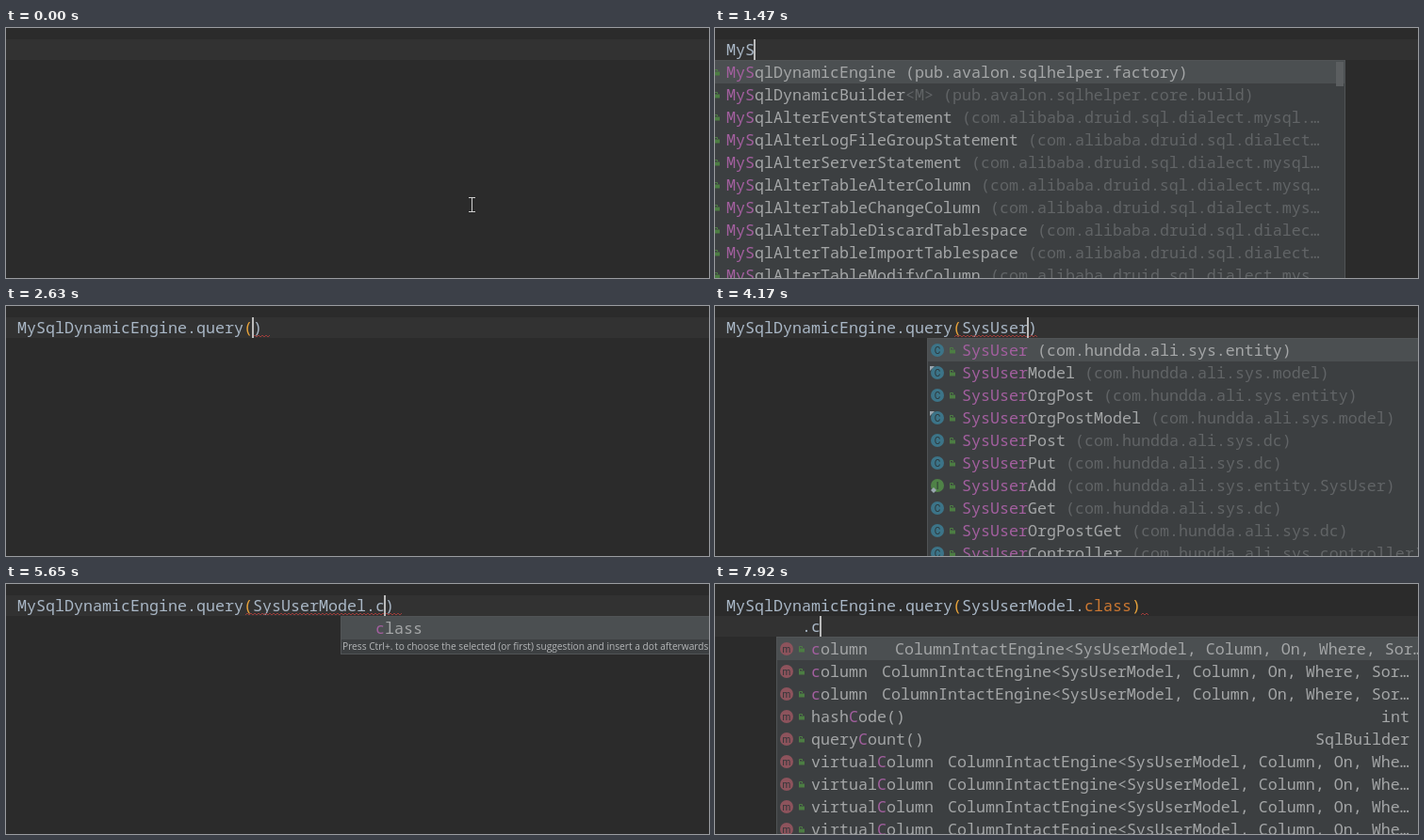
An HTML page that plays this animation: 746 by 266 pixels, repeating every 8000 ms.

```html
<!DOCTYPE html>
<html lang="en">
<head>
<meta charset="utf-8">
<title>Code completion</title>
<style>
  html, body { margin: 0; width: 100%; height: 100%; overflow: hidden; background: #2b2b2b; }
  svg { display: block; width: 746px; height: 266px; }
  text { white-space: pre; }
  .code { font: 16.6667px "Noto Sans Mono", "DejaVu Sans Mono", monospace; }
  .hint { font: 10.2px "Open Sans", "Noto Sans", sans-serif; }
  .icon { font: 10px Roboto, sans-serif; text-anchor: middle; }
</style>
</head>
<body>
<svg id="stage" viewBox="0 0 746 266"></svg>
<script>
const LOOP = 8000, CELL = 10, LEFT = 12, ROW = 24, LINE = 22;
const INK = '#a9b7c6', ITEM = '#a4a6a7', DIM = '#616466', MATCH = '#a35f9f', GOLD = '#e8a33a';
const stage = document.getElementById('stage');

const esc = s => s.replace(/&/g, '&amp;').replace(/</g, '&lt;');
const rect = (x, y, w, h, fill) => `<rect x="${x}" y="${y}" width="${w}" height="${h}" fill="${fill}"/>`;
const label = (x, y, s, fill, extra = '') =>
  `<text class="code" x="${x}" y="${y}" fill="${fill}" ${extra}>${esc(s)}</text>`;

// Completion rows: icon kind, text, optional result type after "|"
const druid = 'com.alibaba.druid.sql.dialect.mysql.';
const cut = (s, n) => s.length > n ? s.slice(0, n - 1) + '…' : s;
const classes = (names, pack) => names.map(n => 'c' + cut(`${n} (${pack}`, 63));
const lists = {
  M: ['cMySqlDynamicEngine (pub.avalon.sqlhelper.factory)', 'cMap<K, V> (java.util)',
    'cMap<E, F> (com.sun.javafx.collections.MappingChange)', 'cMath (java.lang)',
    'cMalformedParameterizedTypeException (java.lang.reflect)',
    'cMalformedParametersException (java.lang.reflect)',
    'cManagementFactory (java.lang.management)', 'cManagementPermission (java.lang.management)',
    'cManifest (java.util.jar)', 'cMatcher (java.util.regex)'],
  MyS: ['cMySqlDynamicEngine (pub.avalon.sqlhelper.factory)',
    'cMySqlDynamicBuilder<M> (pub.avalon.sqlhelper.core.build)',
    ...classes(['EventStatement', 'LogFileGroupStatement', 'ServerStatement', 'TableAlterColumn',
      'TableChangeColumn', 'TableDiscardTablespace', 'TableImportTablespace', 'TableModifyColumn']
      .map(n => 'MySqlAlter' + n), druid + 'ast.statement)')],
  engine: ['mquery(Class<T> tableClass)|SqlQuery<T>', 'mquery(String tableName)|SqlQuery<T>',
    'minsert(Class<T> tableClass)|SqlInsert', 'mupdate(Class<T> tableClass)|SqlUpdate',
    'mdelete(Class<T> tableClass)|SqlDelete', 'mtable(Class<T> tableClass)|SqlTable',
    'mcolumn(Class<T> tableClass)|SqlColumn', 'mwhere(Class<T> tableClass)|SqlWhere',
    'mgroup(Class<T> tableClass)|SqlGroup', 'msort(Class<T> tableClass)|SqlSort'],
  user: ['cSysUser (com.hundda.ali.sys.entity)', 'aSysUserModel (com.hundda.ali.sys.model)',
    'cSysUserOrgPost (com.hundda.ali.sys.entity)', 'aSysUserOrgPostModel (com.hundda.ali.sys.model)',
    'cSysUserPost (com.hundda.ali.sys.dc)', 'cSysUserPut (com.hundda.ali.sys.dc)',
    'iSysUserAdd (com.hundda.ali.sys.entity.SysUser)', 'cSysUserGet (com.hundda.ali.sys.dc)',
    'cSysUserOrgPostGet (com.hundda.ali.sys.dc)', 'cSysUserController (com.hundda.ali.sys.controller)'],
  keys: ['kclass', 'kthis', 'ksuper', 'knew', 'karg', 'kcast', 'kpar', 'kreturn', 'kvar', 'kfield'],
  chain: [],
  c: []
};
const columnType = 'ColumnIntactEngine<SysUserModel, Column, On, Where, Sort>';
const wide = n => `m${n}|${cut(columnType, 56)}`;
const virtual = 'mvirtualColumn|' + cut(columnType, 49);
lists.q = lists.engine.slice(0, 2);
lists.userM = [lists.user[1], lists.user[3]];
lists.klass = ['kclass'];
lists.c = [wide('column'), wide('column'), wide('column'), 'mhashCode()|int',
  'mqueryCount()|SqlBuilder', virtual, virtual, virtual, virtual];
lists.chain = [wide('column'), wide('column'), wide('column'), 'mequals(Object obj)|boolean',
  'mhashCode()|int', 'mquery()|SqlBuilder', 'mqueryCount()|SqlBuilder', virtual, virtual];

function icon(kind, x, y) {
  const fill = { m: '#8d535c', i: '#4f8247' }[kind] || '#3c7488';
  const letter = { m: 'm', i: 'I' }[kind] || 'C';
  let s = `<circle cx="${x}" cy="${y}" r="7" fill="${fill}"/>` +
    `<text class="icon" x="${x}" y="${y + 3.5}" fill="#2c3437">${letter}</text>`;
  if (kind === 'a') s += `<path d="M${x - 8} ${y - 7}h5l-5 5z" fill="#9aa7b0"/>`;
  if (kind === 'i') s += `<path d="M${x - 4} ${y + 2}l3 3-3 3-3-3z" fill="#9aa7b0"/>`;
  return s + rect(x + 13, y - 0.5, 6, 4, '#4c7d43') +
    `<path d="M${x + 13.5} ${y}v-2.5h3v1.5" fill="none" stroke="#4c7d43"/>`;
}

// Colours the typed letters, in order, inside a name
function marked(x, y, name, typed, extra) {
  let k = 0, runs = [];
  for (const ch of name) {
    const hit = k < typed.length && ch.toLowerCase() === typed[k].toLowerCase();
    if (hit) k++;
    const last = runs[runs.length - 1];
    if (last && last.hit === hit) last.s += ch; else runs.push({ hit, s: ch });
  }
  return runs.map(r => {
    const s = label(x, y, r.s, r.hit ? MATCH : ITEM, extra);
    x += r.s.length * CELL;
    return s;
  }).join('');
}

function popup({ list, col, typed = '', hint, line = 0, right = 760 }) {
  const rows = lists[list], x = LEFT + col * CELL - 37, top = 34 + line * LINE;
  const height = rows.length * ROW + (hint ? 17 : 2);
  let s = rect(x, top, right - x, height, '#515456') +
    rect(x + 1, top + 1, right - x - 2, height - 2, '#3c3f41') +
    rect(x + 1, top + 1, right - x - 2, ROW, '#4b4f51');
  rows.forEach((row, i) => {
    const y = top + 1 + i * ROW, kind = row[0], [body, type] = row.slice(1).split('|');
    const name = body.match(/^\w+/)[0], rest = body.slice(name.length);
    const tx = x + 37, bold = kind === 'k' ? 'font-weight="700"' : '';
    if (kind !== 'k') s += icon(kind, x + 11, y + 12);
    s += marked(tx, y + 18, name, typed, bold);
    s += label(tx + name.length * CELL, y + 18, rest, i === 0 || kind === 'm' ? ITEM : DIM);
    if (type) {
      const end = i === 0 && type.endsWith('…') ? 751 : 737;
      s += label(end - type.length * CELL, y + 18, type, ITEM);
    }
  });
  if (right < 746) s += rect(right - 10, top + 2, 8, 26, '#5b5e60');
  if (hint) s += `<text class="hint" x="${x + 2}" y="${top + rows.length * ROW + 12}" fill="#b4b6b8">` +
    'Press Ctrl+. to choose the selected (or first) suggestion and insert a dot afterwards</text>';
  return s;
}

function code(text, solved) {
  let x = LEFT;
  return text.split(/(query\b|class|[()])/).map(part => {
    const gold = part === '(' || (part === ')' && solved);
    const fill = gold ? GOLD : part === 'class' ? '#cc7832' : INK;
    const s = label(x, 29, part, fill, solved && part === 'query' ? 'font-style="italic"' : '');
    x += part.length * CELL;
    return s;
  }).join('');
}

function squiggle(from, to) {
  let d = `M${from} 33`;
  for (let x = from + 2, up = true; x <= to; x += 2, up = !up) d += `L${x} ${up ? 31 : 33}`;
  return `<path d="${d}" fill="none" stroke="#a83e3b" stroke-width="0.9"/>`;
}

function pointer(step) {
  const p = step / 8, e = p * p * (3 - 2 * p);
  const x = Math.round(494 - 364 * e), y = Math.round(188 - 164 * e);
  return `<path d="M${x - 3} ${y - 7.5}h7M${x - 3} ${y + 7.5}h7M${x + .5} ${y - 8}v16" fill="none" stroke="#d0d0d0"/>`;
}

// Steps: time, text, caret column, extras
const E = 'MySqlDynamicEngine', Q = E + '.query(', S = Q + 'SysUser', F = Q + 'SysUserModel.class)';
const start = (list, typed) => ({ pop: { list, typed, col: 0, right: 669 } });
const user = (typed, list = 'user', hint) => ({ pop: { list, typed, col: 25, hint }, wave: [254, 272 + typed.length * CELL] });
const second = (tail, list, typed) => ({ solved: 1, tail, wave: [452, 461], pop: list && { list, typed, col: 9, line: 1 } });
const steps = [
  [0, '', -1, {}],
  [610, '', 0, {}],
  [1160, 'M', 1, {}],
  [1240, 'M', 1, start('M', 'M')],
  [1320, 'My', 2, start('M', 'M')],
  [1390, 'MyS', 3, start('MyS', 'My')],
  [1470, 'MyS', 3, start('MyS', 'MyS')],
  [1790, E, 18, {}],
  [1940, E + '.', 19, {}],
  [2020, E + '.', 19, { pop: { list: 'engine', col: 19 } }],
  [2250, E + '.q', 20, { pop: { list: 'engine', col: 19 } }],
  [2330, E + '.q', 20, { pop: { list: 'q', typed: 'q', col: 19, hint: 1 } }],
  [2540, Q + ')', 25, {}],
  [2630, Q + ')', 25, { wave: [262, 281] }],
  [3320, Q + 'S)', 26, { wave: [254, 291] }],
  [3400, Q + 'Sy)', 27, { wave: [254, 301] }],
  [3480, Q + 'Sys)', 28, { wave: [254, 311] }],
  [3780, Q + 'SysU)', 29, { wave: [254, 311] }],
  [3860, Q + 'SysU)', 29, user('SysU')],
  [3940, Q + 'SysUs)', 30, user('SysUs')],
  [4090, Q + 'SysUse)', 31, user('SysUse')],
  [4170, S + ')', 32, user('SysUser')],
  [4720, S + 'M)', 33, user('SysUserM', 'userM', 1)],
  [5020, S + 'Model)', 37, { wave: [254, 400] }],
  [5420, S + 'Model.)', 38, { wave: [254, 411] }],
  [5570, S + 'Model.)', 38, { wave: [254, 411], pop: { list: 'keys', col: 38 } }],
  [5650, S + 'Model.c)', 39, { wave: [254, 420], pop: { list: 'klass', typed: 'c', col: 38, hint: 1 } }],
  [6110, F, 43, { wave: [254, 452] }],
  [6430, F, 43, { solved: 1, wave: [452, 461] }],
  [6580, F, 44, { solved: 1, wave: [452, 461] }],
  [6980, F, 8, second('')],
  [7440, F, 9, second('.')],
  [7520, F, 9, second('.', 'chain', '')],
  [7600, F, 10, second('.c', 'chain', '')],
  [7680, F, 10, second('.c', 'c', 'c')]
];

function draw([, text, col, { pop, wave, solved, tail }], move) {
  const y = tail === undefined ? 12 : 12 + LINE;
  let s = rect(0, 0, 746, 266, '#2b2b2b') + rect(0, y, 746, LINE, '#323232') + code(text, solved);
  if (tail) s += label(LEFT + 8 * CELL, 29 + LINE, tail, INK);
  if (wave) s += squiggle(...wave);
  if (col >= 0) s += rect(LEFT + col * CELL - 1, y, 2, LINE, '#bbbbbb');
  if (pop) s += popup(pop);
  if (!text) s += pointer(move);
  stage.innerHTML = s;
}

let shown = '';
const began = performance.now();
function tick() {
  const t = (performance.now() - began) % LOOP;
  const at = steps.findLastIndex(step => step[0] <= t);
  const move = t < 70 ? 0 : Math.min(8, 1 + Math.floor((t - 70) / 77));
  const key = at + ':' + move;
  if (key !== shown) {
    shown = key;
    draw(steps[at], move);
  }
  requestAnimationFrame(tick);
}
tick();
</script>
</body>
</html>
```
